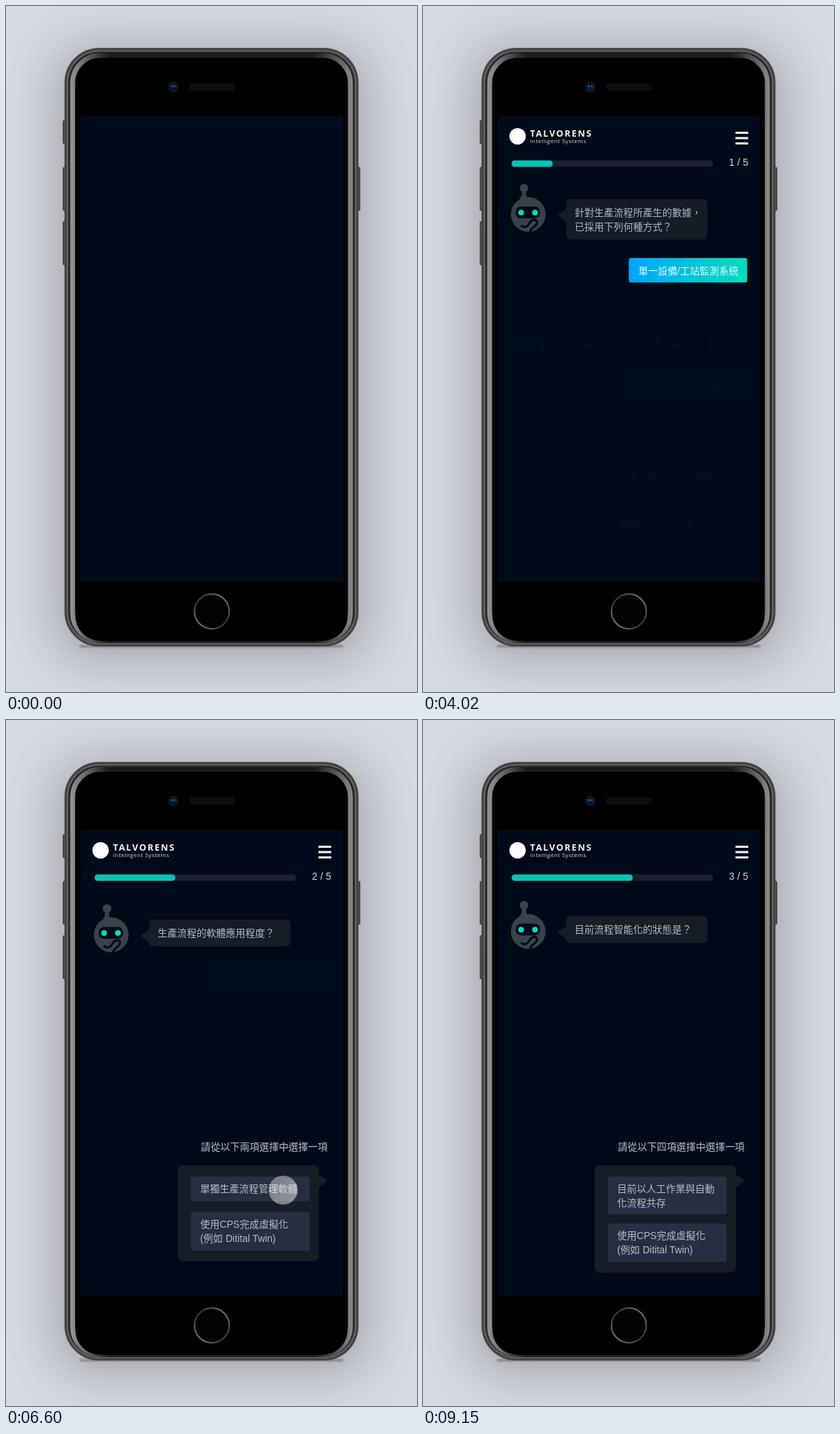
These frames come from a looping animation (580 by 966 pixels, 9.96 s). An HTML page:

```html
<!DOCTYPE html>
<html lang="zh-TW">
<head>
<meta charset="utf-8">
<title>Chat survey on a phone</title>
<style>
  html, body { margin: 0; width: 100%; height: 100%; overflow: hidden; background: #d5d9e2; }
  svg { display: block; width: 580px; height: 966px; }
  text { font: 13.75px "Liberation Sans", "Noto Sans CJK TC", "Noto Sans CJK", sans-serif; fill: #b3bac6; }
  .brand { font: 700 12.5px "Open Sans", sans-serif; letter-spacing: 1.8px; fill: #f4f5f7; }
  .tag { font: 500 8px "Open Sans", sans-serif; letter-spacing: .5px; fill: #d4d8de; }
  .count { font-size: 14px; text-anchor: end; fill: #d3d7de; }
  .hint { fill: #b9c0ca; }
  .answer text { fill: #e6fbff; }
  .bubble { fill: #161d27; }
  .option { fill: #282e41; }

  .anim, .anim * { animation-duration: 9960ms; animation-iteration-count: infinite; animation-timing-function: linear; }
  .intro { animation-name: intro; }
  .anim .scroll { animation-name: scroll; animation-timing-function: cubic-bezier(.7, 0, .3, 1); }
  .anim .fill { animation-name: fill; animation-timing-function: cubic-bezier(.7, 0, .3, 1); }
  .q1 { animation-name: q1; }
  .q2 { animation-name: q2; }
  .q3 { animation-name: q3; }
  .p1 { animation-name: p1; }
  .p2 { animation-name: p2; }
  .a1 { animation-name: a1; }
  .a2 { animation-name: a2; }
  .anim .count { animation-timing-function: step-end; }
  .c1 { animation-name: c1; }
  .c2 { animation-name: c2; }
  .c3 { animation-name: c3; }
  .anim .dot { animation-name: dot; animation-timing-function: ease-in-out; }

  @keyframes intro { 0%, 1.81% { opacity: 0 } 4.82%, 100% { opacity: 1 } }
  @keyframes scroll {
    0%, 39.06% { transform: translateY(0) }
    48.04%, 76.22% { transform: translateY(-177px) }
    85.21%, 100% { transform: translateY(-319px) }
  }
  @keyframes fill {
    0%, 39.06% { width: 57px }
    48.04%, 76.22% { width: 114px }
    85.21%, 100% { width: 171px }
  }
  @keyframes q1 { 0%, 40.36% { opacity: 1 } 43.17%, 100% { opacity: 0 } }
  @keyframes q2 { 0%, 40.2% { opacity: 0 } 46.39%, 77.71% { opacity: 1 } 80.52%, 100% { opacity: 0 } }
  @keyframes q3 { 0%, 77.55% { opacity: 0 } 84.04%, 100% { opacity: 1 } }
  @keyframes p1 { 0%, 8.73% { opacity: 0 } 15.66%, 31.12% { opacity: 1 } 34.14%, 100% { opacity: 0 } }
  @keyframes p2 { 0%, 40.2% { opacity: 0 } 46.39%, 68.37% { opacity: 1 } 71.39%, 100% { opacity: 0 } }
  @keyframes a1 { 0%, 33.13% { opacity: 0 } 37%, 40.36% { opacity: 1 } 43.17%, 100% { opacity: 0 } }
  @keyframes a2 { 0%, 71.39% { opacity: .015 } 75.3%, 77.71% { opacity: 1 } 80.52%, 100% { opacity: 0 } }
  @keyframes c1 { 0% { opacity: 1 } 43.37%, 100% { opacity: 0 } }
  @keyframes c2 { 0% { opacity: 0 } 43.37% { opacity: 1 } 80.6%, 100% { opacity: 0 } }
  @keyframes c3 { 0% { opacity: 0 } 80.6%, 100% { opacity: 1 } }
  @keyframes dot {
    0%, 18.97% { transform: translate(499px, 653px); opacity: .66 }
    25.6%, 28.01% { transform: translate(363px, 653px); opacity: .66 }
    29.1% { transform: translate(363px, 653px) scale(.86); opacity: .66 }
    30.12% { transform: translate(363px, 653px); opacity: .66 }
    32.2% { transform: translate(363px, 653px) scale(1.1); opacity: 0 }
    32.3%, 58% { transform: translate(499px, 662px); opacity: 0 }
    58.13% { transform: translate(499px, 662px); opacity: .5 }
    64.76%, 66.27% { transform: translate(391px, 662px) scale(.95); opacity: .5 }
    67.4% { transform: translate(391px, 662px) scale(.84); opacity: .5 }
    68.4% { transform: translate(391px, 662px); opacity: .5 }
    70.5%, 100% { transform: translate(391px, 662px) scale(1.1); opacity: 0 }
  }
</style>
</head>
<body>
<svg viewBox="0 0 580 966">
  <defs>
    <filter id="blur" x="-40%" y="-20%" width="180%" height="140%"><feGaussianBlur stdDeviation="32"/></filter>
    <filter id="soft" x="-10%" y="-200%" width="120%" height="500%"><feGaussianBlur stdDeviation="1.5"/></filter>
    <linearGradient id="steel">
      <stop offset="0" stop-color="#8e8e8e"/>
      <stop offset=".025" stop-color="#7a7a7a"/>
      <stop offset=".13" stop-color="#1c1c1c"/>
      <stop offset=".87" stop-color="#1c1c1c"/>
      <stop offset=".975" stop-color="#6c6c6c"/>
      <stop offset="1" stop-color="#858585"/>
    </linearGradient>
    <linearGradient id="ring" x1="0" y1="1" x2="1" y2="0">
      <stop offset="0" stop-color="#8a8a8a"/>
      <stop offset=".4" stop-color="#3c3c3c"/>
      <stop offset=".6" stop-color="#3c3c3c"/>
      <stop offset="1" stop-color="#8a8a8a"/>
    </linearGradient>
    <linearGradient id="sea">
      <stop offset="0" stop-color="#00a8ff"/>
      <stop offset="1" stop-color="#02e0bd"/>
    </linearGradient>
    <linearGradient id="touch" x1="0" y1="0" x2="1" y2="1">
      <stop offset="0" stop-color="#fff" stop-opacity=".75"/>
      <stop offset="1" stop-color="#fff"/>
    </linearGradient>
    <clipPath id="screen"><rect x="105" y="155" width="371" height="656" rx="3"/></clipPath>

    <!-- robot: origin is the top of its speech bubble -->
    <g id="bot">
      <g fill="#3a4249">
        <circle cx="142.500" cy="-15.500" r="6"/>
        <path d="M139.500-12h6v6q0 3 4 5h-14q4-2 4-5z"/>
        <circle cx="148.500" cy="21.500" r="24.500"/>
      </g>
      <rect x="130.500" y="10.500" width="35" height="16.500" rx="8" fill="#000a18"/>
      <g fill="#00dccb">
        <circle cx="138.500" cy="19" r="4"/>
        <circle cx="158" cy="19" r="4"/>
      </g>
      <path d="M138 37c6 5 10 1 13-4s10-5 10 0-8 6-10 13" fill="none" stroke="#000a18" stroke-width="3"/>
    </g>
    <path id="tailLeft" d="M203 13l-11 8q-3 2 0 4l11 8z" class="bubble"/>
    <path id="tailRight" d="M440 639l12 8q3 2 0 4l-12 8z" class="bubble"/>
    <rect id="answerBox" x="290.500" width="167" height="34.500" rx="3" fill="url(#sea)"/>
  </defs>

  <!-- backdrop and phone -->
  <rect width="580" height="966" fill="#d5d9e2"/>
  <rect x="68" y="56" width="444" height="866" rx="54" fill="#57504f" opacity=".37" filter="url(#blur)"/>
  <rect x="104" y="900" width="372" height="3" rx="1.500" fill="#555" opacity=".6" filter="url(#soft)"/>
  <g fill="#505050" stroke="#343434" stroke-width=".8">
    <rect x="80.500" y="161" width="6" height="33" rx="1.500"/>
    <rect x="80.500" y="227" width="6" height="61" rx="1.500"/>
    <rect x="80.500" y="303.500" width="6" height="61" rx="1.500"/>
    <rect x="493.500" y="227" width="6" height="61" rx="1.500"/>
  </g>
  <rect x="83.500" y="60" width="413" height="841" rx="48" fill="#222" stroke="#4a4a4a" stroke-width="2"/>
  <rect x="86.500" y="63" width="407" height="835" rx="45" fill="none" stroke="#5c5c5c" stroke-width="3"/>
  <rect x="94" y="69.500" width="392" height="824" rx="39" fill="#000" stroke="url(#steel)" stroke-width="7"/>
  <rect x="98" y="73" width="384" height="821" rx="35" fill="#000"/>
  <circle cx="236" cy="114" r="7.500" fill="#12151c"/>
  <circle cx="236" cy="114" r="4.500" fill="#0a1430"/>
  <g fill="#24579f"><circle cx="234" cy="113" r="1.400"/><circle cx="238" cy="113" r="1.400"/></g>
  <rect x="260" y="110" width="62" height="8" rx="2" fill="#0c0c0c" stroke="#181818"/>
  <circle cx="290.500" cy="852.500" r="24.500" fill="#020202" stroke="url(#ring)" stroke-width="2"/>
  <rect x="105" y="155" width="371" height="656" rx="3" fill="#000a18"/>

  <g clip-path="url(#screen)"><g class="anim intro">
    <!-- conversation -->
    <g class="scroll">
      <g class="q1"><g transform="translate(0 275)">
        <use href="#bot"/><use href="#tailLeft"/>
        <rect class="bubble" x="202" width="199.500" height="57" rx="6"/>
        <text x="214" y="24">針對生產流程所產生的數據，<tspan x="214" dy="20">已採用下列何種方式？</tspan></text>
      </g></g>
      <g class="answer a1"><g transform="translate(0 358)">
        <use href="#answerBox"/><text x="304" y="22.500">單一設備/工站監測系統</text>
      </g></g>
      <g class="q2"><g transform="translate(0 458)">
        <use href="#bot"/><use href="#tailLeft"/>
        <rect class="bubble" x="202" width="199.500" height="38" rx="6"/>
        <text x="214" y="24">生產流程的軟體應用程度？</text>
      </g></g>
      <g class="answer a2"><g transform="translate(0 524)">
        <use href="#answerBox"/><text x="304" y="22.500">單獨生產流程管理軟體</text>
      </g></g>
      <g class="q3"><g transform="translate(0 595.300)">
        <use href="#bot"/><use href="#tailLeft"/>
        <rect class="bubble" x="202" width="199.500" height="38" rx="6"/>
        <text x="214" y="24">目前流程智能化的狀態是？</text>
      </g></g>
    </g>

    <!-- choices -->
    <g class="p1">
      <text class="hint" x="275" y="606">請從以下兩項選擇中選擇一項</text>
      <rect class="bubble" x="242" y="627" width="199.500" height="155" rx="7"/><use href="#tailRight"/>
      <rect class="option" x="261" y="643" width="167.500" height="34.500" rx="3"/>
      <rect class="option" x="261" y="693" width="167.500" height="75" rx="3"/>
      <text x="274" y="665">單一設備/工站監測系統</text>
      <text x="274" y="715">已導入AI進行系統演算<tspan x="274" dy="20">與分析，並進行自動優</tspan><tspan x="274" dy="20">化</tspan></text>
    </g>
    <g class="p2">
      <text class="hint" x="275" y="606">請從以下兩項選擇中選擇一項</text>
      <rect class="bubble" x="242" y="627" width="199.500" height="135" rx="7"/><use href="#tailRight"/>
      <rect class="option" x="261" y="643" width="167.500" height="34.500" rx="3"/>
      <rect class="option" x="261" y="693" width="167.500" height="54.500" rx="3"/>
      <text x="274" y="665">單獨生產流程管理軟體</text>
      <text x="274" y="715">使用CPS完成虛擬化<tspan x="274" dy="20">(例如 Ditital Twin)</tspan></text>
    </g>
    <g class="q3">
      <text class="hint" x="275" y="606">請從以下四項選擇中選擇一項</text>
      <rect class="bubble" x="242" y="627" width="199.500" height="151" rx="7"/><use href="#tailRight"/>
      <rect class="option" x="261" y="643" width="167.500" height="53" rx="3"/>
      <rect class="option" x="261" y="709" width="167.500" height="54" rx="3"/>
      <text x="274" y="665">目前以人工作業與自動<tspan x="274" dy="20">化流程共存</tspan></text>
      <text x="274" y="731">使用CPS完成虛擬化<tspan x="274" dy="20">(例如 Ditital Twin)</tspan></text>
    </g>

    <!-- header -->
    <circle cx="133.500" cy="183.500" r="11.500" fill="#fff"/>
    <text class="brand" x="151" y="183.500">TALVORENS</text>
    <text class="tag" x="151" y="193">Intelligent Systems</text>
    <path d="M441 178.500h18m-18 7.500h18m-18 7.500h18" stroke="#f4f5f7" stroke-width="3"/>
    <rect x="125" y="217.500" width="284.500" height="9" rx="4.500" fill="#1c2030"/>
    <rect class="fill" x="125" y="217.500" width="57" height="9" rx="4.500" fill="#0ac2b4"/>
    <text class="count c1" x="459" y="225">1 / 5</text>
    <text class="count c2" x="459" y="225">2 / 5</text>
    <text class="count c3" x="459" y="225">3 / 5</text>

    <circle class="dot" r="21.500" fill="url(#touch)"/>
  </g></g>
</svg>
</body>
</html>
```
